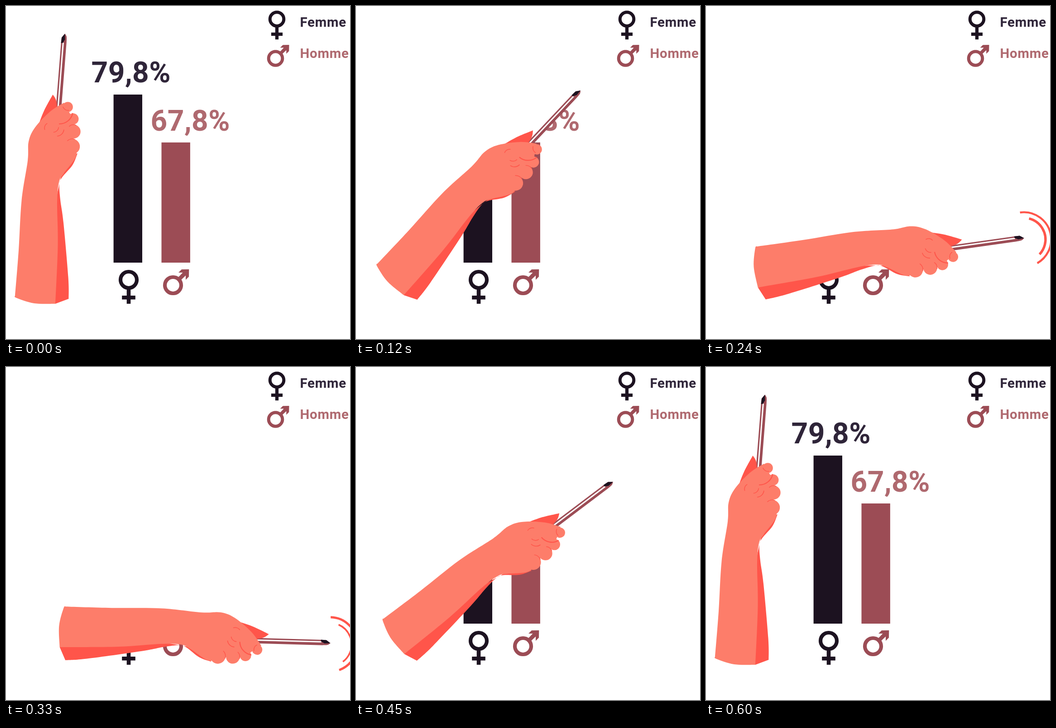
Animation of 760 by 737 pixels, one loop 2.7 s. Source, as an HTML page with a canvas:

```html
<!DOCTYPE html>
<html lang="fr">
<head>
<meta charset="utf-8">
<title>Femme / Homme</title>
<style>
  html, body { margin: 0; width: 100%; height: 100%; overflow: hidden; background: #fff; }
  canvas { display: block; }
</style>
</head>
<body>
<canvas id="stage" width="760" height="737"></canvas>
<script>
const ctx = document.getElementById('stage').getContext('2d');

const INK = '#1c1220', ROSE = '#9c4c55', INK_TEXT = '#2f2539', ROSE_TEXT = '#af696f';
const SKIN = '#fd7d6a', SHADE = '#ff554a';

const LOOP = 2700, STEP = 30, PEAK = 10, SWING = 96.8;
const rad = deg => deg * Math.PI / 180;
const clamp = (v, lo, hi) => Math.max(lo, Math.min(hi, v));

// Each run of points becomes a smooth curve; runs meet at sharp corners.
function curve(...runs) {
  const path = new Path2D();
  runs.forEach((run, r) => {
    const at = i => run[clamp(i, 0, run.length - 1)];
    r ? path.lineTo(...at(0)) : path.moveTo(...at(0));
    for (let i = 0; i < run.length - 1; i++) {
      const [a, b, c, d] = [at(i - 1), at(i), at(i + 1), at(i + 2)];
      path.bezierCurveTo(
        b[0] + (c[0] - a[0]) / 6, b[1] + (c[1] - a[1]) / 6,
        c[0] - (d[0] - b[0]) / 6, c[1] - (d[1] - b[1]) / 6, ...c);
    }
  });
  return path;
}

const poly = points => curve(...points.map(p => [p]));

const arm = curve(
  [[20, 641], [28, 540], [34.5, 430], [48, 342], [50, 300], [64, 269], [97, 234], [128, 214]],
  [[148, 250], [150, 300], [155, 332], [128, 370], [117, 390], [113, 435], [114.5, 530], [109, 659]],
  [[109, 659], [62, 658], [23, 646], [20, 641]]);

const shade = curve(
  [[158, 326], [147, 352], [124, 379], [118, 395], [120, 429], [127, 480], [137.5, 600], [138.5, 648]],
  [[109, 659], [100, 500], [130, 340]]);

const backFinger = curve([[70, 268], [84, 232], [103.5, 196]], [[103.5, 196], [111, 210], [114, 240]]);

// x, y, radius, from the thumb down
const fingers = [[136.5, 223.5, 11.3], [148, 250, 12.5], [149.5, 278, 15.2], [146.5, 311, 16.7]];
// x, y, radius, first angle
const creases = [[118, 231, 30, 0.2], [112, 272, 16, 0.1], [104, 267, 12.5, 0.1],
  [97, 270, 12, 2.8], [137, 219, 12, 1.4]];

function fill(path, color) {
  ctx.fillStyle = color;
  ctx.fill(path);
}

function arc(x, y, radius, from, to, width) {
  if (width <= 0) return;
  ctx.lineWidth = width;
  ctx.beginPath();
  ctx.arc(x, y, radius, from, to);
  ctx.stroke();
}

function sign(x, y, size, draw, color) {
  ctx.save();
  ctx.translate(x, y);
  ctx.scale(size, size);
  ctx.fillStyle = ctx.strokeStyle = color;
  arc(0, 0, 18, 0, 2 * Math.PI, 8.2);
  draw();
  ctx.restore();
}

function female() {
  ctx.fillRect(-4.3, 20, 8.6, 33);
  ctx.fillRect(-14.8, 35, 29.6, 8.5);
}

function male() {
  const half = [[12, -18], [21.5, -28], [12, -28], [19, -35]];
  const mirror = half.map(([x, y]) => [-y, -x]).reverse();
  ctx.fill(poly([...half, [35.3, -35.3], ...mirror]));
}

function label(text, x, y, size, gap, color) {
  ctx.font = `bold ${size}px Roboto, sans-serif`;
  ctx.letterSpacing = gap + 'px';
  ctx.fillStyle = color;
  ctx.fillText(text, x, y);
}

function turn(deg) {
  ctx.translate(134.3, 644.6);
  ctx.rotate(rad(deg));
  ctx.translate(-134.3, -644.6);
}

// Moves the origin to the pencil tip, with y running down the pencil.
function toPencil() {
  ctx.translate(130.2, 61.3);
  ctx.rotate(rad(4.5));
}

function drawBar(x, top, color) {
  ctx.fillStyle = color;
  ctx.fillRect(x, top, 63.4, 568 - top);
}

function drawLegend() {
  sign(598.5, 29, 0.85, female, INK);
  sign(595.5, 116, 0.85, male, ROSE);
  label('Femme', 649.5, 45.5, 29.5, 0.7, INK_TEXT);
  label('Homme', 649.5, 115, 29.5, 0.7, ROSE_TEXT);
}

// The chart only shows on the side the pencil has not swept over.
function drawChart(deg) {
  ctx.save();
  turn(deg);
  toPencil();
  ctx.beginPath();
  ctx.rect(-2.5, -1000, 3000, 3000);
  ctx.clip();
  ctx.resetTransform();
  drawBar(237.6, 196, INK);
  drawBar(343.5, 302, ROSE);
  label('79,8%', 188.5, 169, 64, 0.5, INK_TEXT);
  label('67,8%', 319.5, 276, 64, 0.5, ROSE_TEXT);
  sign(271, 606, 1, female, INK);
  sign(369, 618, 1, male, ROSE);
  ctx.restore();
}

function drawPencil() {
  ctx.save();
  toPencil();
  fill(curve([[0, 0], [4, 6], [5, 18]], [[5, 168]], [[-7, 168]], [[-7, 20]], [[-6.5, 9]]), ROSE);
  ctx.fillStyle = '#fff';
  ctx.fillRect(-3.8, 20, 3, 148);
  fill(poly([[0, 0], [-6.5, 9], [-7, 21], [-3.5, 21], [1, 13]]), INK);
  ctx.restore();
}

function drawArm() {
  fill(backFinger, SHADE);
  fill(shade, SHADE);
  fill(arm, SKIN);
  for (const [x, y, r] of fingers) {
    ctx.beginPath();
    ctx.arc(x, y, r, 0, 2 * Math.PI);
    ctx.fill();
  }
  ctx.strokeStyle = SHADE;
  for (const [x, y, r] of fingers.slice(2)) arc(x, y, r, -2.3, -1.2, 1.4);
  for (const [x, y, r, from] of creases) arc(x, y, r, from, from + 1.4, 1 + r / 25);
}

// Two ripples around the tip swell and thin out near the low point.
function drawRipples(k) {
  const ripple = (radius, from, to, width) => arc(133, 62.5, radius, rad(from), rad(to), width);
  ripple(60.3, -175.5, -17, Math.min(5, 1.6 * (4.45 - Math.abs(k - 9.65))));
  ripple(47.8, -153.5, -34, Math.min(5.5, 1.8 * (4 - Math.abs(k - 9))));
}

function draw(t) {
  const k = Math.min(Math.floor(t / STEP), 2 * PEAK);
  const deg = SWING * (1 - Math.abs(k - PEAK) / PEAK);
  ctx.fillStyle = '#fff';
  ctx.fillRect(0, 0, 760, 737);
  drawChart(deg);
  drawLegend();
  ctx.save();
  turn(deg);
  drawPencil();
  drawArm();
  drawRipples(k);
  ctx.restore();
}

const start = performance.now();
function tick() {
  draw((performance.now() - start) % LOOP);
  requestAnimationFrame(tick);
}
tick();
</script>
</body>
</html>
```
